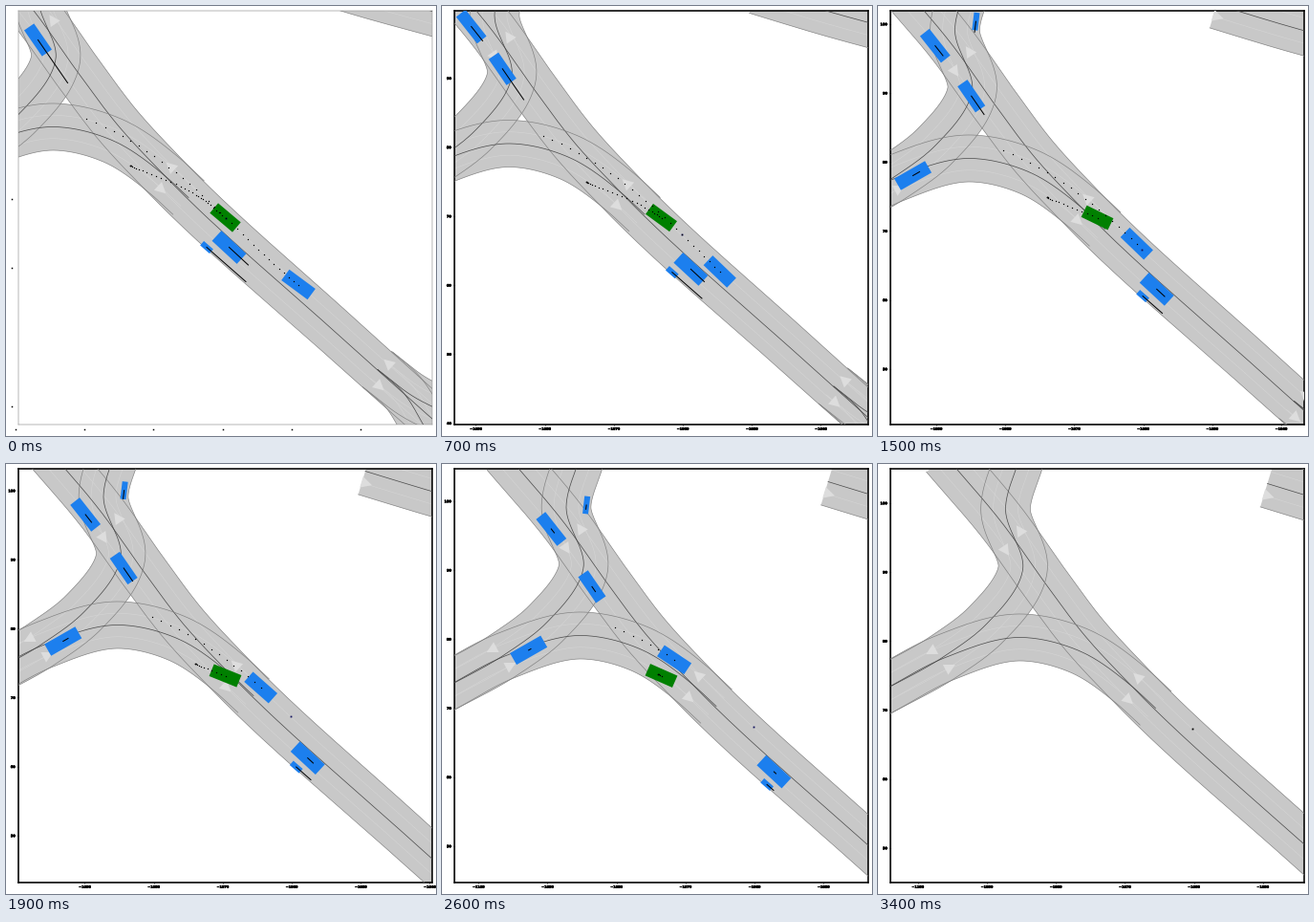
Animation of 450 by 450 pixels, one loop 3.9 s. Source, as a matplotlib script:

```python
import numpy as np
import matplotlib.pyplot as plt
from math import comb
from matplotlib.animation import FuncAnimation
from matplotlib.patches import Polygon
from matplotlib.patheffects import withStroke

SIZE, DPI = 450, 100
PX = 72 / DPI                       # one pixel in points
LEFT, TOP, VIEW = 13, 5, 433        # square view in pixels
HALF = VIEW / 2
GRID = 72.2                         # ten metres
FRAMES, LAST, STOP = 39, 33, 30     # the scene empties after LAST

ROAD, PALE, ARROW = "#c8c8c8", "#d4d4d4", "#dddddd"
EDGE, MIDDLE = "#808080", "#484848"
BLUE, GREEN = "#1c7fee", "#008000"


def hermite(t, knots, values):
    """Smooth curve through the values at the given knots."""
    knots, values = np.asarray(knots, float), np.asarray(values, float)
    slope = np.gradient(values, knots, axis=0)
    i = np.clip(np.searchsorted(knots, t, "right") - 1, 0, len(knots) - 2)
    h = (knots[i + 1] - knots[i])[:, None]
    s = (t - knots[i])[:, None] / h
    return ((2 * s**3 - 3 * s**2 + 1) * values[i]
            + (s**3 - 2 * s**2 + s) * h * slope[i]
            + (3 * s**2 - 2 * s**3) * values[i + 1]
            + (s**3 - s**2) * h * slope[i + 1])


def curve(points, n=160):
    step = np.hypot(*np.diff(points, axis=0).T)
    knots = np.r_[0, np.cumsum(step)]
    return hermite(np.linspace(0, knots[-1], n), knots, points)


def headings(path):
    dx, dy = np.gradient(path, axis=0).T
    return np.arctan2(dy, dx)


def frame_of(angle):
    """Unit vectors along and to the right of a heading."""
    along = np.stack([np.cos(angle), np.sin(angle)], -1)
    right = np.stack([-np.sin(angle), np.cos(angle)], -1)
    return along, right


def bezier(points, power=1.0):
    """Position per step along a Bezier path, braking when power > 1."""
    t = 1 - (1 - np.linspace(0, 1, LAST + 1)) ** power
    n = len(points) - 1
    return sum(comb(n, j) * np.outer(t**j * (1 - t)**(n - j), p)
               for j, p in enumerate(points))


# Centre line, half width at its start and end
ROADS = [
    ([(70, -9), (130, 62), (175, 125), (215, 178), (265, 232), (445, 397),
      (550, 491)], 26, 23.5),
    ([(148, -8), (133, 46), (151, 110), (112, 168), (70, 200), (0, 239)], 26, 25),
    ([(0, 239), (70, 202), (150, 181), (210, 195), (265, 232), (290, 255)], 25, 24),
    ([(407, 20), (478, 41.5), (560, 64)], 25.5, 25.5),
    ([(488, 435), (513, 457), (540, 500)], 24, 24),
    ([(488, 435), (525, 463), (560, 481)], 24, 24),
]

# Junction mouths: centre, heading in degrees, lanes with an arrow
MOUTHS = [((65, 204), -28, (1, -1)), ((140.5, 79.5), 56, (1, -1)),
          ((266.5, 234.5), 43, (1, -1)), ((494.5, 440.5), 42, (1, -1)),
          ((407, 20), 17, (1,))]

# The ego car leads the camera: key steps and positions until it stops
EGO = hermite(np.arange(STOP + 1), (0, 7, 11, 15, 19, 26, STOP),
              [(328.5, 276), (307.5, 258.5), (297.5, 252), (282, 243),
               (260.5, 234), (232.5, 223), (229, 221)])
HOLD = np.minimum(np.arange(LAST + 1), STOP)

# Bezier points, braking power, length, width
TRAFFIC = [
    ([(405, 346), (349, 306), (292, 218), (183.5, 172.5)], 1, 34, 14),
    ([(332.5, 307), (352.5, 325.5)], 1.45, 35.5, 14.5),
    ([(309, 307), (350, 343)], 1.15, 13, 6),
    ([(132.5, 90), (163.5, 135)], 1.4, 33, 12.5),
    ([(105.5, 54.5), (120.5, 73.5)], 1, 35.5, 12.5),
    ([(82, 203), (96, 195)], 1.15, 37, 14),
    ([(156, 28.4), (153.6, 48.8)], 1, 18.5, 6),
]

fig = plt.figure(figsize=(SIZE / DPI, SIZE / DPI), dpi=DPI, facecolor="white")
ax = fig.add_axes([LEFT / SIZE, 1 - (TOP + VIEW) / SIZE, VIEW / SIZE, VIEW / SIZE])


def draw_map():
    lines = []
    for points, start, end in ROADS:
        mid = curve(points)
        _, right = frame_of(headings(mid))
        offset = right * np.linspace(start, end, len(mid))[:, None]
        lines.append((mid, offset))
        outline = np.vstack([mid + offset, (mid - offset)[::-1]])
        ax.add_patch(Polygon(outline, fc=ROAD, lw=0, zorder=1))
    for mid, offset in lines:
        for side in (1, -1):
            ax.plot(*(mid + side * offset / 2).T, color=PALE, lw=.6 * PX, zorder=2)
            ax.plot(*(mid + side * offset).T, color=EDGE, lw=.65 * PX, zorder=3)
        ax.plot(*mid.T, color=MIDDLE, lw=.7 * PX, zorder=3)


def draw_arrows():
    for centre, degrees, lanes in MOUTHS:
        for lane in lanes:
            d, n = lane * np.array(frame_of(np.radians(degrees)))
            c = centre + 12 * n + 4 * d
            ax.add_patch(Polygon([c + 7 * d, c - 4.5 * d + 6 * n, c - 4.5 * d - 6 * n],
                                 fc=ARROW, lw=0, zorder=4))


def draw_ticks():
    n = np.arange(-1, 9)
    ax.set_xticks(41.2 + GRID * n, [f"\u2212{1100 - 10 * i}" for i in n])
    ax.set_yticks(40.3 + GRID * n, [f"{100 - 10 * i}" for i in n])
    ax.tick_params(axis="x", length=PX, width=.8 * PX, pad=1.7 * PX)
    ax.tick_params(axis="y", length=PX, width=.8 * PX, pad=2.4 * PX)
    for label in ax.get_xticklabels() + ax.get_yticklabels():
        label.set(fontsize=3.5 * PX, fontweight="bold", fontfamily="DejaVu Sans",
                  path_effects=[withStroke(linewidth=.6 * PX, foreground="black")])


def add_actor(path, length, width, color):
    """A rotating box with its remaining path: dots when fast, a line when slow."""
    patch = ax.add_patch(Polygon(np.zeros((4, 2)), fc=color, lw=0, zorder=5))
    speed = np.hypot(*np.diff(path, axis=0).T).mean()
    style = (dict(ls="", marker="s", ms=1.2 * PX, mew=0) if speed > 2
             else dict(lw=PX))
    trail, = ax.plot([], [], color="black", zorder=7, **style)
    return path, length, width, patch, trail


draw_map()
draw_arrows()
draw_ticks()
origin, = ax.plot(*EGO[0], "s", ms=1.8 * PX, mew=0, zorder=6)

actors, angles = [], []
for points, power, length, width in TRAFFIC:
    path = bezier(points, power)
    actors.append(add_actor(path, length, width, BLUE))
    angles.append(headings(path))
actors.append(add_actor(EGO[HOLD], 31, 13.5, GREEN))
angles.append(headings(EGO)[HOLD])

# Label fragments seen only in the opening view
mark_x = np.r_[10 + GRID * np.arange(6), 6, 6, 6]
mark_y = np.r_[np.full(6, 443), 202, 274, 419]
fragments = plt.Line2D(mark_x / SIZE, 1 - mark_y / SIZE, ls="", marker="s",
                       ms=1.5 * PX, mew=0, color="black", transform=fig.transFigure)
fig.add_artist(fragments)


def style_view(opening):
    for spine in ax.spines.values():
        spine.set(color="0.6" if opening else "black", snap=False,
                  linewidth=(.7 if opening else 1.6) * PX)
    ax.tick_params(left=not opening, bottom=not opening,
                   labelleft=not opening, labelbottom=not opening)
    fragments.set_visible(opening)


def draw(i):
    k, live = min(i, LAST), i <= LAST
    centre = EGO[HOLD[k]]
    ax.set_xlim(centre[0] - HALF, centre[0] + HALF)
    ax.set_ylim(centre[1] + HALF, centre[1] - HALF)
    for (path, length, width, patch, trail), angle in zip(actors, angles):
        shown = live and np.abs(path[k] - centre).max() < HALF
        u, v = frame_of(angle[k])
        u, v = u * length / 2, v * width / 2
        patch.set_xy(path[k] + [u + v, u - v, -u - v, v - u])
        trail.set_data(*path[k:].T)
        patch.set_visible(shown)
        trail.set_visible(shown)
    origin.set_color("#10105c" if live else "black")
    style_view(i == 0)
    return []


anim = FuncAnimation(fig, draw, frames=FRAMES, init_func=lambda: draw(0),
                     interval=100, repeat=True, repeat_delay=0, blit=False)
plt.show()
```
